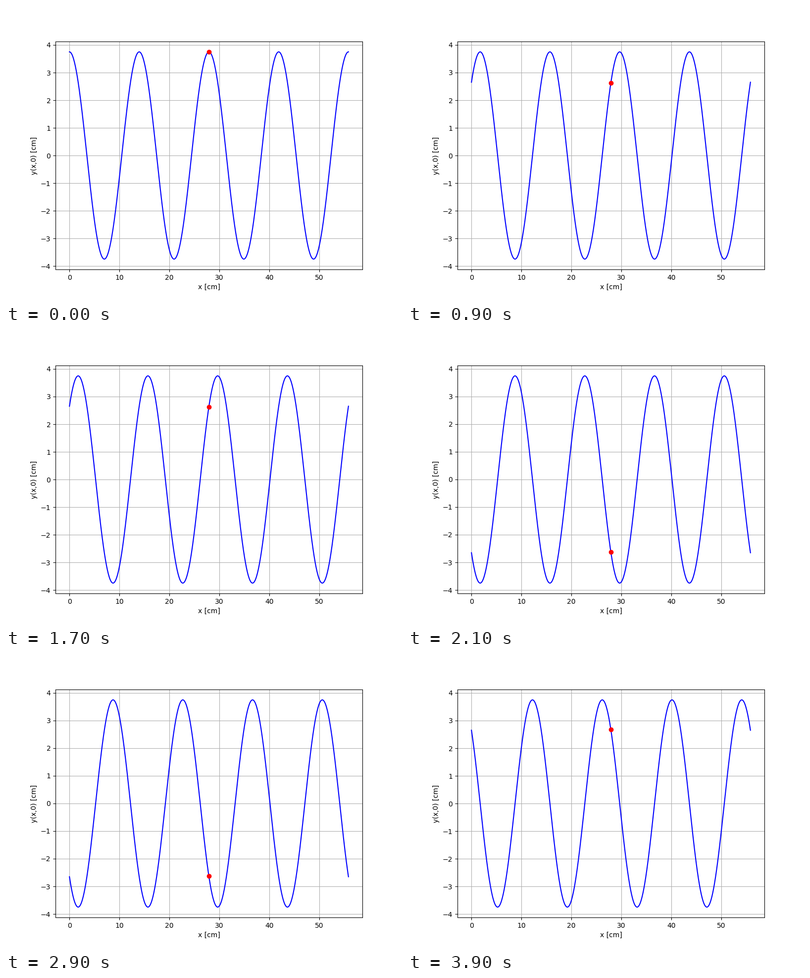
A matplotlib script for the animation above (4000 ms loop, 800 by 600 pixels).

```python
import numpy as np
import matplotlib.pyplot as plt
from matplotlib.animation import FuncAnimation

AMPLITUDE = 3.75          # cm
WAVE_NUMBER = 0.45        # rad/cm
FRAMES_PER_PERIOD = 8
FRAMES = 40
INTERVAL = 100            # ms

wavelength = 2 * np.pi / WAVE_NUMBER
x = np.linspace(0, 4 * wavelength, 1000)
mid = 499                 # sample followed by the dot


def wave(frame):
    """Wave travelling to the right, sampled along x."""
    phase = 2 * np.pi * frame / FRAMES_PER_PERIOD
    return AMPLITUDE * np.cos(WAVE_NUMBER * x - phase)


fig, ax = plt.subplots(figsize=(8, 6), dpi=100)
curve, = ax.plot(x, wave(0), "b", lw=1.5)
dot, = ax.plot([x[mid]], [wave(0)[mid]], "ro", ms=6)
ax.set_xlabel("x [cm]")
ax.set_ylabel("y(x,0) [cm]")
ax.grid(True)


def update(frame):
    y = wave(frame)
    curve.set_ydata(y)
    dot.set_ydata([y[mid]])
    # Limits follow the sampled extremes.
    ax.relim()
    ax.autoscale_view()
    return curve, dot


anim = FuncAnimation(fig, update, frames=FRAMES, interval=INTERVAL,
                     repeat=True, repeat_delay=0)
plt.show()
```
